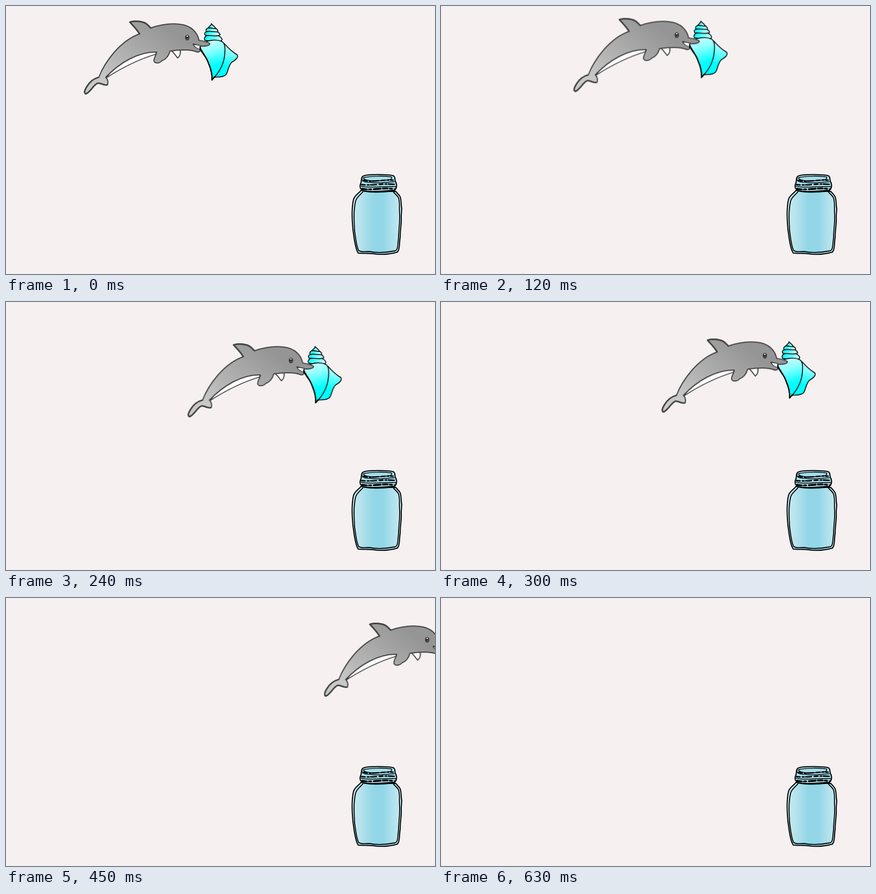
These frames come from a looping animation (800x500 px, 0.66 s). An HTML page:

```html
<!DOCTYPE html>
<html lang="en">
<head>
<meta charset="utf-8">
<title>Dolphin, shell and jar</title>
<style>
html, body { margin: 0; width: 100%; height: 100%; overflow: hidden; background: #f6f0f0; }
svg { display: block; width: 800px; height: 500px; }
path { stroke-linecap: round; stroke-linejoin: round; }
.line { fill: none; }
#swim { animation: swim 660ms infinite; }
/* each stretch moves evenly, in ticks of 30 ms */
@keyframes swim {
  0% { transform: translate(0, 0); animation-timing-function: steps(3); }
  13.63636% { transform: translate(78px, -17px); animation-timing-function: steps(3); }
  27.27273% { transform: translate(149px, 20px); animation-timing-function: steps(2); }
  36.36364% { transform: translate(193.4px, 50px); animation-timing-function: steps(14); }
  100% { transform: translate(701.6px, -12px); }
}
</style>
</head>
<body>
<svg viewBox="0 0 800 500">
  <defs>
    <linearGradient id="skin" gradientUnits="userSpaceOnUse" x1="195" y1="150" x2="285" y2="30">
      <stop offset="0" stop-color="#c8c8c8"/>
      <stop offset=".35" stop-color="#b4b4b4"/>
      <stop offset=".65" stop-color="#a6a6a6"/>
      <stop offset="1" stop-color="#959595"/>
    </linearGradient>
    <linearGradient id="whorl" x1="0" x2="1" y1="0" y2=".3">
      <stop offset=".15" stop-color="#0ff"/>
      <stop offset="1" stop-color="#c8ffff"/>
    </linearGradient>
    <linearGradient id="shell" gradientUnits="userSpaceOnUse" x1="376" y1="64" x2="393" y2="116">
      <stop offset="0" stop-color="#ccffff"/>
      <stop offset=".35" stop-color="#94ffff"/>
      <stop offset=".9" stop-color="#0ff"/>
    </linearGradient>
    <linearGradient id="lip" gradientUnits="userSpaceOnUse" x1="420" y1="78" x2="409" y2="122">
      <stop offset="0" stop-color="#b4ffff"/>
      <stop offset=".8" stop-color="#0ff"/>
    </linearGradient>
    <linearGradient id="glass" gradientUnits="userSpaceOnUse" x1="646" y1="0" x2="738" y2="0">
      <stop offset="0" stop-color="#c6e9f0"/>
      <stop offset=".14" stop-color="#b9e4ed"/>
      <stop offset=".42" stop-color="#92d6e7"/>
      <stop offset=".62" stop-color="#92d6e7"/>
      <stop offset=".9" stop-color="#bce5ee"/>
      <stop offset="1" stop-color="#c6e9f0"/>
    </linearGradient>
  </defs>

  <g id="jar" stroke="#000" stroke-width="2">
    <path fill="url(#glass)" d="M662 344C658 350 650 353 648 361C645 374 645 397 647 417L649 432C651 445 653 456 657 461C669 462 680 461 691 463C704 464 717 463 730 459C735 454 733 443 735 432C735 418 738 406 737 392L738 378C736 369 738 360 734 354L727 346Z"/>
    <path class="line" stroke-width="1.8" d="M666 346C662 352 654 356 652 364C648 381 649 399 650 419C652 433 653 446 657 455C659 459 667 459 677 458C692 461 709 460 724 457C732 456 730 446 732 433C732 418 735 404 734 389C733 378 735 367 732 358C729 352 724 350 722 346"/>
    <path fill="#a6dde9" d="M665 318C669 313 717 314 723 317C727 320 724 325 727 329C730 335 728 342 723 345C706 347 684 349 667 345C660 342 659 338 661 332C664 328 661 322 665 318Z"/>
    <path class="line" stroke-width="1.5" d="M667 320C682 317 706 317 719 319C721 324 714 325 705 325C691 327 673 327 667 322ZM664 321C662 326 667 329 680 329C695 332 712 328 724 328M662 336C680 341 705 335 727 337"/>
    <path class="line" stroke-width="2.6" stroke-dasharray="7 4 3 3 11 5" d="M667 325C682 330 705 323 722 325M663 333C681 336 706 330 726 333"/>
    <path class="line" stroke-width="3.4" stroke-dasharray="9 4 4 5 13 4" d="M664 341C682 345 706 337 725 342"/>
    <path class="line" stroke-width="2" d="M667 345C684 348 706 345 722 344"/>
  </g>

  <g id="swim">
    <g stroke="#000" stroke-width="1.6">
      <path fill="url(#whorl)" d="M371 64C368 59 373 54 381 54C391 53 400 55 403 62C403 65 399 67 391 67Z"/>
      <path fill="url(#whorl)" d="M372 55C368 50 373 46 382 47C391 46 399 49 399 54C393 58 379 54 372 55Z"/>
      <path fill="url(#whorl)" d="M374 48C371 43 376 40 383 40C391 40 396 44 395 48C388 49 380 46 374 48Z"/>
      <path fill="url(#whorl)" d="M383 33C383 37 378 38 377 41C383 40 387 43 391 42C390 38 386 37 383 33Z"/>
      <path fill="url(#lip)" d="M407 70C414 78 421 85 431 91C434 96 428 101 421 105C415 111 415 119 411 127C407 133 398 132 389 133C400 119 408 97 407 70Z"/>
      <path fill="url(#shell)" d="M362 72C373 64 391 61 402 66C409 69 409 79 408 88C407 110 397 125 384 138C385 124 381 112 374 98C368 91 364 85 361 78Z"/>
      <path class="line" stroke-width="2.3" d="M361 76C365 86 374 95 378 108C382 117 385 126 384 138M384 138L389 132"/>
    </g>

    <g stroke="#424242" stroke-width="2">
      <path fill="#fff" d="M308 83C313 87 316 92 320 97C324 94 326 89 325 82"/>
      <path fill="#fff" stroke-width="1.6" d="M187 134C202 113 229 92 256 87L281 85L279 90C243 101 215 116 187 134Z"/>
      <path fill="url(#skin)" d="M231 30C240 27 257 28 264 35L270 41C287 35 307 32 324 34C346 36 357 50 360 64C367 65 375 66 380 70C380 74 373 75 365 75L349 71C350 75 355 78 362 80C365 83 361 86 357 86C346 81 327 81 306 84C304 91 299 99 291 102C287 107 278 108 276 103C275 97 280 93 281 86C246 85 212 106 186 133C190 137 191 143 189 147C181 149 178 143 171 144C163 147 158 160 149 164C144 162 148 155 151 150C157 140 165 135 173 133C180 115 190 100 202 86C218 68 232 58 249 52C243 42 237 37 231 30Z"/>
      <path class="line" stroke-width="2.8" d="M231 30C240 27 257 28 264 35L270 41M249 52C243 42 237 37 231 30M189 147C181 149 178 143 171 144C163 147 158 160 149 164C144 162 148 155 151 150C157 140 165 135 173 133"/>
      <path fill="#fff" stroke-width="1.3" d="M349 71L363 74L362 81C355 79 351 76 349 71Z"/>
      <path class="line" stroke="#000" stroke-width="2.2" d="M362 76L362 82"/>
    </g>
    <ellipse cx="338" cy="59" rx="4" ry="5.2" fill="#333"/>
    <circle cx="338" cy="56.3" r="1.3" fill="#eee"/>
    <path class="line" stroke="#888" stroke-width="1" d="M337 62Q339 63 340 60"/>
  </g>
</svg>
</body>
</html>
```
